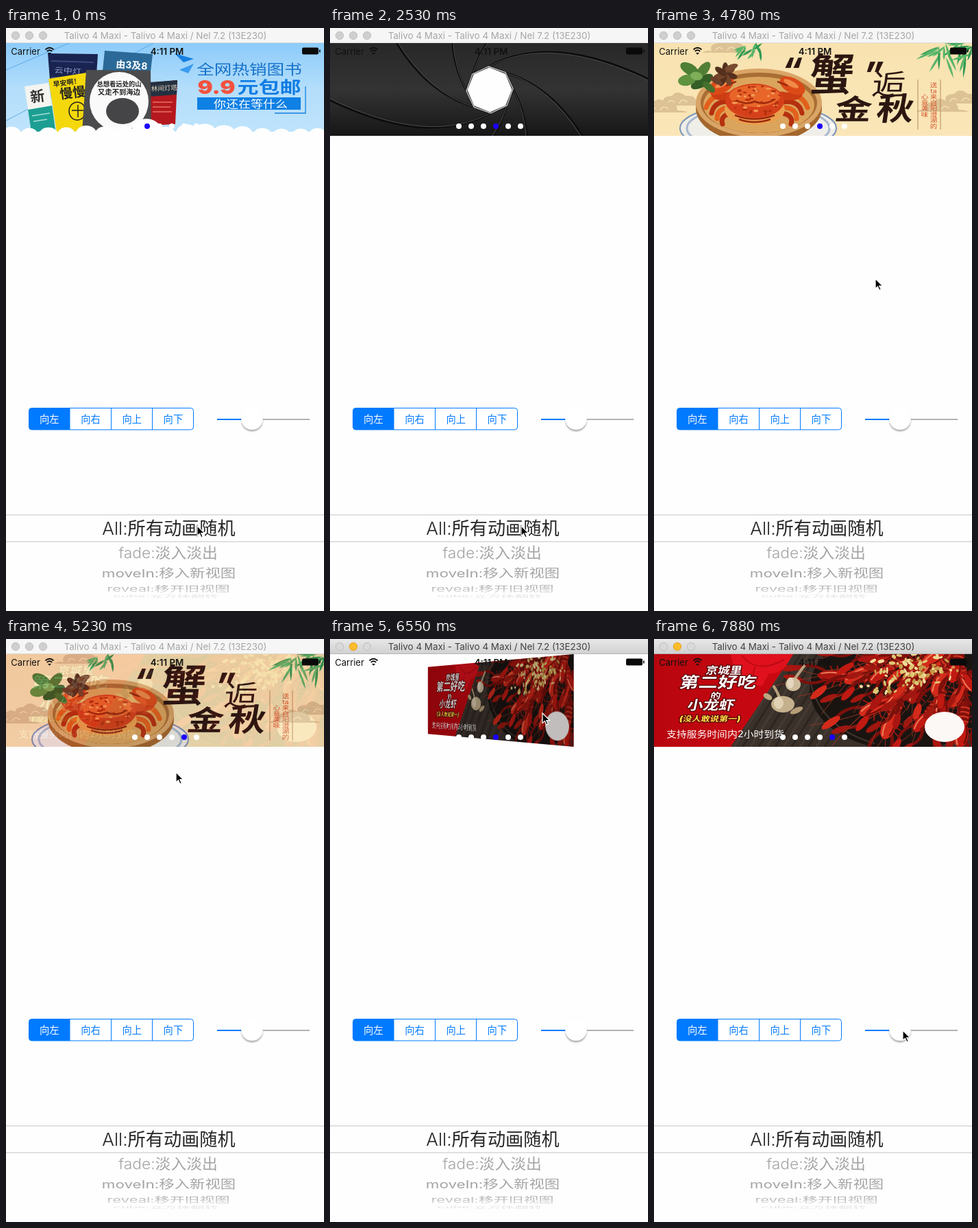
Animation of 464 by 849 pixels, one loop 8000 ms. Source, as an HTML page:

```html
<!DOCTYPE html>
<html lang="zh">
<head>
<meta charset="utf-8">
<title>Banner transitions</title>
<style>
html, body { margin: 0; width: 100%; height: 100%; overflow: hidden; background: #fefefe; }
#stage { position: relative; width: 464px; height: 849px; overflow: hidden; background: #fefefe; }
#stage > svg { position: absolute; left: 0; top: 0; }
.page { position: absolute; left: 0; top: 22px; width: 464px; height: 135px; overflow: hidden; display: none; }
.page svg { display: block; }
#flap { transform-origin: 0 0; }
#flap::after { content: ""; position: absolute; inset: 0; background: #f4f4f4; opacity: .72; }
text { font-family: Inter, "Noto Sans CJK SC", "Noto Sans CJK", sans-serif; text-anchor: middle; }
</style>
</head>
<body>
<div id="stage"></div>
<script>
const W = 464, H = 849;

// ---------- drawing helpers ----------
const range = n => [...Array(n).keys()];
function seeded(a) {
  return () => {
    a = a + 0x6D2B79F5 | 0;
    let t = Math.imul(a ^ a >>> 15, 1 | a);
    t = t + Math.imul(t ^ t >>> 7, 61 | t) ^ t;
    return ((t ^ t >>> 14) >>> 0) / 4294967296;
  };
}
// x is the centre, y the baseline, sy flattens the glyphs
function text(s, x, y, size, fill, o = {}) {
  const edge = o.edge ? ` stroke="${o.edge}" stroke-width="${o.ew || 4}" stroke-linejoin="round" paint-order="stroke"` : '';
  return `<text transform="translate(${x} ${y}) rotate(${o.rot || 0}) skewX(${o.skew || 0}) scale(1 ${o.sy || 1})" ` +
    `font-size="${size}" font-weight="${o.w || 400}" fill="${fill}"${edge}>${s}</text>`;
}
const poly = (pts, fill) => `<polygon points="${pts}" fill="${fill}"/>`;
const oval = (x, y, rx, ry, fill, more = '') => `<ellipse cx="${x}" cy="${y}" rx="${rx}" ry="${ry}" fill="${fill}" ${more}/>`;
const leaf = (x, y, rx, ry, a, fill) => oval(x, y, rx, ry, fill, `transform="rotate(${a} ${x} ${y})"`);
const rect = (x, y, w, h, fill, more = '') => `<rect x="${x}" y="${y}" width="${w}" height="${h}" fill="${fill}" ${more}/>`;
const line = (d, color, w = 1, more = '') => `<path d="${d}" fill="none" stroke="${color}" stroke-width="${w}" ${more}/>`;
const puffs = list => list.map(([x, y, r]) => oval(x, y, r, r * .8, '#fefefe')).join('');

// ---------- banners ----------
function books() {
  return rect(0, 22, W, 135, 'url(#sky)') +
    line('M0 135L215 22M0 61L92 22', '#4a9fe0', .8) +
    poly('61,37 134,38 130,100 66,100', '#1a2450') + text('云中灯', 90, 66, 13, '#93a2cc', { sy: .8, rot: 4 }) +
    line('M66 48L128 50M66 72L120 74', '#3a4a80', 2) +
    poly('144,33 214,38 209,80 140,72', '#2b6a98') + text('由3及8', 183, 59, 14, '#fff', { w: 700, rot: 4 }) +
    line('M164 65L203 68', '#b8d4e6', 1.5) +
    poly('27,85 62,80 72,148 37,152', '#f4f4f0') + poly('32,119 67,113 72,148 37,152', '#1c9f92') +
    text('新', 47, 107, 21, '#333', { w: 700, rot: -8 }) + line('M38 128L64 124M40 136L60 133', '#a8e0d8', 1.5) +
    poly('62,74 118,65 114,150 74,152', '#f4d80c') + text('早安啊！', 89, 83, 10, '#222', { w: 700, rot: -8 }) +
    text('慢慢', 98, 101, 19, '#222', { w: 900, rot: -7 }) +
    line('M96 120h17M105 112v18', '#222', 1.5) + oval(104, 121, 12, 13, 'none', 'stroke="#222" stroke-width="1.5"') +
    poly('207,80 250,76 247,140 210,142', '#b5191f') + poly('210,79 250,76 249,97 209,100', '#243040') +
    text('林间灯塔', 231, 91, 9.5, '#e6d6bc', { rot: -3 }) + line('M214 108h29M214 115h26M214 122h28', '#dc5c50', 2) +
    poly('117,61 211,62 212,152 111,152', '#4b4b4d') + oval(165, 107, 43, 43, '#fafafa') +
    text('总想看远处的山', 165, 85, 9.3, '#222', { w: 700 }) + text('又走不到海边', 165, 97, 10.3, '#222', { w: 700 }) +
    oval(170, 121, 24, 19, '#454547') +
    poly('246,37 274,45 259,50', '#1680e0') + poly('253,61 274,52 266,66', '#3b9cf0') +
    text('全网热销图书', 355, 68, 25.6, '#1571c9', { sy: .8, w: 300 }) +
    text('9.9', 307, 96, 33, '#f4513d', { sy: .84, w: 900 }) +
    text('元包邮', 384, 95, 31, '#0f7be2', { sy: .76, w: 900 }) +
    rect(279, 101, 151, 18, '#0f80e4') + text('你还在等什么', 357, 115.5, 18, '#fff', { sy: .8 }) +
    line('M437 85V124H392', '#1680e0', 1.3) +
    puffs([[8, 155, 14], [34, 155, 12], [62, 156, 14], [88, 155, 13], [117, 154, 15], [145, 156, 16], [172, 156, 17], [205, 149, 21],
      [233, 155, 14], [264, 153, 16], [290, 153, 17], [318, 156, 18], [345, 155, 15], [374, 157, 14], [402, 156, 12], [430, 157, 13], [455, 157, 14]]) +
    rect(0, 151, W, 6, '#fefefe');
}

function packet(x, y, a, s) {
  return `<g transform="translate(${x} ${y}) rotate(${a}) scale(${s})">${rect(-14, -9, 28, 18, '#e0222b')}` +
    line('M-14 -9L0 0L14 -9', '#b9121e', 1.5) + text('¥', 0, 6, 14, '#ffd34a', { w: 700 }) + '</g>';
}
const coin = (x, y, r) => oval(x, y, r, r * .88, '#f2b51d') + oval(x, y, r * .75, r * .64, '#ffd84a') +
  text('¥', x, y + r * .4, r * 1.1, '#d8900c', { w: 700 });

function envelopes() {
  const edge = '#6e0d12', big = (s, x, y, z, sy, c = '#fff') => text(s, x, y, z, c, { w: 900, edge, ew: 5, sy });
  return rect(0, 22, W, 135, '#ffe100') + oval(109, 108, 87, 70, '#fb2f3a') +
    '<path d="M52 43Q55 32 108 36Q160 32 164 46Q166 60 140 61Q108 68 72 60Q50 57 52 43Z" fill="#ee3038"/>' +
    oval(108, 46, 48, 9, '#b70f20') + line('M54 52Q108 70 163 52', '#c41522', 3) +
    coin(76, 43, 11) + coin(147, 43, 11) + coin(151, 71, 11) + coin(79, 60, 5) +
    puffs([[18, 142, 49], [55, 151, 20], [82, 156, 21], [115, 157, 18], [150, 157, 18], [180, 155, 16], [204, 152, 17], [240, 146, 28],
      [296, 150, 39], [330, 155, 22], [362, 154, 22], [398, 152, 22], [455, 133, 45], [428, 150, 25]]) + rect(0, 146, W, 11, '#fefefe') +
    big('千元红包', 106.5, 94, 27, .86) + big('再次来袭', 107, 111, 20, .86) + big('根本停不下来', 107, 133, 18, .86) +
    packet(203, 57, -22, .9) + packet(232, 50, 28, 1.15) + packet(432, 49, -18, .65) + packet(340, 136, 22, .5) +
    big('疯狂的', 265, 94, 31, .86, '#ffe88a') + big('红包', 353, 94, 41, .86, '#ffd83a') + big('君', 409, 94, 29, .86, '#ffe88a') +
    text('升级最新版本领取红包', 320, 115, 18.6, '#f0321f', { w: 700, sy: .8 });
}

function leaves(x, y, n, seed, len) {
  const r = seeded(seed);
  return range(n).map(() => {
    const a = 60 + r() * 120, l = len * (.6 + r() * .5), c = r() < .5 ? '#2f9a52' : '#59b56a';
    return `<path transform="translate(${x + (r() - .5) * len * 1.7} ${y + r() * len * .7}) rotate(${a})" d="M0 0Q${l / 2} -4 ${l} 0Q${l / 2} 3 0 0" fill="${c}"/>`;
  }).join('');
}
const swirl = (x, y) => `<path d="M${x - 14} ${y}q8 -5 14 -2q-4 -12 12 -12q8 -10 20 0q16 -2 16 11q10 0 16 3Z" fill="#dcc294"/>` +
  line(`M${x + 6} ${y - 3}q4 -8 10 -2M${x + 23} ${y - 3}q4 -9 12 -2`, '#f3dfb2', 1.5);

function crab() {
  const cx = 150, both = f => [-1, 1].map(f).join('');
  const legs = both(s => range(4).map(i =>
    line(`M${cx + s * 32} ${102 + i * 7}Q${cx + s * (64 - i * 3)} ${90 + i * 12} ${cx + s * (74 - i * 8)} ${116 + i * 8}`,
      i % 2 ? '#b5300f' : '#e2601c', 7, 'stroke-linecap="round"')).join(''));
  const claws = both(s =>
    line(`M${cx + s * 36} 98Q${cx + s * 64} 104 ${cx + s * 62} 90`, '#cc3d14', 11, 'stroke-linecap="round"') +
    leaf(cx + s * 52, 84, 20, 11, s * 28, '#dc4a18') + leaf(cx + s * 50, 81, 12, 4, s * 28, '#f08a48') +
    line(`M${cx + s * 30} 78L${cx + s * 45} 84`, '#8e230a', 2));
  const r = seeded(4), spots = range(45).map(() => {
    const q = r() * 6.3, d = Math.sqrt(r());
    return oval(cx - 3 + 38 * d * Math.cos(q), 105 + 22 * d * Math.sin(q), 1 + r() * 3, 1 + r(), r() < .5 ? '#f59a55' : '#b2300e');
  }).join('');
  return rect(0, 22, W, 135, 'url(#sand)') + swirl(14, 113) + swirl(-14, 123) + swirl(396, 122) + swirl(426, 110) + swirl(84, 36) +
    leaves(440, 20, 26, 5, 34) + leaves(143, 18, 12, 9, 20) +
    oval(152, 146, 114, 36, '#efeee8', 'stroke="#7c95ba" stroke-width="2"') + oval(152, 146, 104, 33, 'none', 'stroke="#a9b9cf" stroke-width="3"') +
    oval(153, 117, 92, 51, '#a4672d') + oval(153, 109, 92, 50, '#d9a566') + oval(153, 109, 85, 44, '#a86d33') + oval(153, 112, 81, 41, '#dba45c') +
    legs + claws + oval(cx - 3, 119, 44, 22, '#e9a04e') + oval(cx - 3, 106, 43, 25, '#d5401a') + oval(cx - 3, 99, 37, 16, '#e8662a') + spots +
    line(`M${cx - 30} 105q14 8 27 2q13 6 27 -2M${cx - 32} 127q28 11 58 0M${cx - 26} 133q22 8 46 0`, '#9c290c', 2.5) +
    leaf(52, 60, 15, 8, 30, '#4d7f35') + leaf(70, 78, 18, 8, -30, '#345f26') + leaf(48, 76, 13, 8, -10, '#5f9340') +
    leaf(72, 61, 14, 7, -50, '#527f36') + leaf(62, 70, 9, 6, 10, '#7fae58') + leaf(80, 86, 11, 5, 40, '#44702e') +
    range(7).map(i => `<g transform="rotate(${i * 51} 104 68)">${oval(104, 60, 4.5, 10, i % 2 ? '#74452a' : '#54301d')}</g>`).join('') +
    leaf(91, 77, 10, 4, 30, '#6a402a') + leaf(113, 57, 10, 4, -20, '#7a4c30') +
    text('“', 198, 78, 48, '#2c1611', { w: 800, skew: -10 }) + text('”', 317, 84, 48, '#2c1611', { w: 800, skew: -10 }) +
    text('蟹', 257, 91, 64, '#2c1611', { w: 700, skew: -6 }) + text('逅', 341, 97, 48, '#2c1611', { sy: .85, skew: -6 }) +
    text('金', 289, 133, 54, '#2c1611', { w: 700, sy: .75, skew: -8 }) + text('秋', 350, 134, 54, '#2c1611', { w: 700, sy: .85, skew: -8 }) +
    line('M385 75V148M418 75V148', '#b98a58', 1) +
    ['送', 'ta', ...'来自阳澄湖的'].map((c, i) => text(c, 408, 86 + i * 8.5, 10.5, '#d2532a', { sy: .8 })).join('') +
    [...'心意美味'].map((c, i) => text(c, 395, 103 + i * 8.5, 10.5, '#d2532a', { sy: .8 })).join('');
}

// head at the origin, claws towards -x, tail towards +x
function crayfish(x, y, a, s, tone) {
  return `<g transform="translate(${x} ${y}) scale(1 .8) rotate(${a}) scale(${s})">` +
    line('M4 -6Q-14 -20 -34 -11M4 6Q-14 18 -30 8', '#7a100c', 4.5) +
    line('M0 0Q-30 -4 -66 -20M0 0Q-30 8 -60 20', '#9a3420', .8) +
    line('M8 -16L14 0L2 17M17 -17L18 0L12 17M25 -15L24 0L22 16', '#8c1610', 2) +
    leaf(-42, -9, 14, 5, -8, tone) + leaf(-38, 6, 12, 4.500, 10, '#a01710') +
    oval(42, 0, 24, 8, '#820f0b') + oval(13, 0, 20, 9, tone) + line('M-3 -3Q13 -8 27 -3', '#ee7a58', 2) + line('M0 5Q13 9 28 5', '#6d0c08', 2) +
    range(4).map(i => line(`M${32 + i * 7} -7q4 7 0 14`, '#cc3622', 2.5)).join('') + '</g>';
}

function seafood() {
  const r = seeded(37), tones = ['#c01a12', '#d42a1a', '#a91510'];
  const pile = range(26).map(i => {
    const a = 68 + (i * 47 % 122) + r() * 8, q = a * Math.PI / 180, d = 225 - i * 6.5;
    return crayfish(450 + d * Math.cos(q), 12 + d * .68 * Math.sin(q), a + 180 + (r() - .5) * 44, 1 + r() * .25, tones[i % 3]);
  }).join('');
  const bits = range(95).map(i => {
    const u = (r() + r() - 1), v = (r() + r() - 1);
    return leaf(375 + u * 75, 48 - u * 18 + v * 32, 1.500 + r() * 3.500, 1.200 + r() * 2, r() * 180, ['#e0c674', '#c49a48', '#f0dc98'][i % 3]);
  }).join('');
  const white = (s, x, y, z, sy, c = '#fff') => text(s, x, y, z, c, { w: 900, edge: '#5c0508', ew: 3, sy, skew: -12 });
  return rect(0, 22, W, 135, '#3a312b') +
    range(13).map(i => line(`M${105 + i * 12} 157L${190 + i * 12} 22`, i % 2 ? '#463b33' : '#2d2520', 3)).join('') +
    oval(365, 72, 138, 90, '#1a1411') + line('M228 60Q240 128 322 152', '#40352e', 2) + pile + bits +
    poly('0,22 203,22 112,157 0,157', 'url(#red)') +
    '<path d="M112 22H203L192 40Q180 52 168 50L158 68Q140 70 134 56Q116 50 112 22Z" fill="#e0111c"/>' +
    line('M128 24Q150 52 190 30M150 64Q142 50 148 40', '#bd0a15', 2) +
    line('M204 60Q214 46 220 38M184 88Q180 76 174 68', '#b7a17c', 4) +
    oval(203, 66, 11, 10, '#cdbb9b') + oval(199, 64, 5, 8, '#e4d7bf') +
    oval(188, 95, 17, 12, '#c4b08c') + oval(182, 93, 7, 9, '#e0d1b4') + leaf(208, 104, 10, 4, -25, '#b59e78') + leaf(166, 84, 7, 4, 30, '#bda680') +
    white('京城里', 101, 51, 17.5, .85) + white('第二好吃', 92, 71, 28, .8) + white('的', 89, 87, 15, .8) + white('小龙虾', 82, 103, 23, .82) +
    white('(没人敢说第一)', 81, 120, 13.2, .82, '#ffe24a') +
    text('支持服务时间内2小时到货', 104, 142.5, 14.8, '#fff', { sy: .85 }) +
    oval(424, 128, 29, 22, '#fbf8f6');
}

function iris() {
  const hole = range(8).map(i => {
    const a = (i * 45 - 93) * Math.PI / 180;
    return `${(34 * Math.cos(a)).toFixed(1)} ${(34 * Math.sin(a)).toFixed(1)}`;
  }).join('L');
  const blades = range(8).map(i => `<g transform="rotate(${i * 45})">` +
    line('M24 24L1 34Q-90 84 -233 15', '#0c0c0c', 3) + line('M24 24L1 34Q-90 82 -233 13', '#4c4c4c', 1) + '</g>').join('');
  return `<g id="blades"><path fill-rule="evenodd" fill="url(#steel)" d="M-600 -600H600V600H-600ZM${hole}Z"/>${blades}` +
    `<path d="M${hole}Z" fill="none" stroke="#bdbdbd" stroke-width="1.5" vector-effect="non-scaling-stroke"/></g>`;
}

// ---------- fixed interface ----------
const stops = (id, dir, list) => `<linearGradient id="${id}" ${dir}>` +
  list.map((c, i) => `<stop offset="${i / (list.length - 1)}" stop-color="${c}"/>`).join('') + '</linearGradient>';
const down = 'x1="0" y1="0" x2="0" y2="1"';
const defs = '<defs>' + stops('sky', down, ['#8ccbfa', '#b4defb', '#c0e4fc']) + stops('sand', down, ['#f8e2b0', '#fae6b8']) +
  stops('red', 'x1="0" y1="0" x2="1" y2="0"', ['#b8060e', '#cc0812']) + stops('bar', down, ['#e8e8e8', '#d0d0d0']) +
  stops('fade', down, ['#a4a4a4', '#dedede']) +
  stops('steel', 'gradientUnits="userSpaceOnUse" x1="0" y1="-68" x2="0" y2="68"', ['#282828', '#333333', '#161616']) +
  '<filter id="soft" x="-50%" y="-50%" width="200%" height="200%"><feGaussianBlur stdDeviation="1.3"/></filter></defs>';

function controls() {
  const blue = '#007aff';
  return rect(33.5, 553.5, 240, 31.5, '#fff', `rx="4" stroke="${blue}"`) +
    `<path d="M93.500 553.500H37.500a4 4 0 0 0 -4 4v23.500a4 4 0 0 0 4 4h56Z" fill="${blue}"/>` +
    line('M153.500 553.500v31.500M213.500 553.500v31.500', blue) +
    [...'左右上下'].map((c, i) => text('向' + c, 63.3 + i * 60.2, 574.6, 14.3, i ? blue : '#fff')).join('') +
    line('M308 570H443', '#b3b3b3', 2) + line('M308 570H345', blue, 2) +
    oval(359, 572.5, 15.5, 15, '#000', 'opacity=".32" filter="url(#soft)"') + oval(359, 569.5, 15.8, 15.5, '#fff') +
    line('M0 709H464M0 748H464', '#d6d6d6', 1.5) +
    text('All:所有动画随机', 237.5, 738, 26.2, '#262626', { w: 300 }) +
    text('fade:淡入淡出', 236.5, 772, 22.8, '#a4a4a4', { sy: .95, w: 300 }) +
    text('moveIn:移入新视图', 237.5, 800, 22.4, '#a4a4a4', { sy: .74 }) +
    text('reveal:移开旧视图', 237, 821, 22, 'url(#fade)', { sy: .5 }) +
    text('cube:立方体翻转', 233, 829, 20, '#e4e4e4', { sy: .24 });
}

function status() {
  return text('Carrier', 28.5, 38.5, 13, '#111') + text('4:11 PM', 235, 38.5, 13.3, '#111', { w: 600 }) +
    line('M57.500 31.500Q63.500 26 69.500 31.500M59.800 34Q63.500 30.500 67.200 34', '#111', 1.8) + poly('61,36 66,36 63.5,39', '#111') +
    rect(432, 28.5, 24, 10, '#0a0a0a', 'rx="2"') + rect(457, 31.5, 1.6, 4, '#0a0a0a') +
    range(6).map(i => `<circle class="dot" cx="${188 + i * 18}" cy="143" r="4"/>`).join('');
}

function titleBar(on) {
  return rect(0, 0, W, 22, on ? 'url(#bar)' : '#f6f6f6') + rect(0, 21, W, 1, on ? '#b4b4b4' : '#dcdcdc') +
    range(3).map(i => {
      const lit = on && i === 1;
      return oval(14 + i * 20, 11, 5.7, 5.7, lit ? '#fdbc2e' : on ? '#d9d9d9' : '#cfcfcf', `stroke="${lit ? '#e0a123' : '#c0c0c0'}"`);
    }).join('') +
    text('Talivo 4 Maxi - Talivo 4 Maxi / Nel 7.2 (13E230)', 232.5, 16, 13.4, on ? '#404040' : '#a6a6a6');
}

const layer = (body, attr = '') => `<svg width="${W}" height="${H}" viewBox="0 0 ${W} ${H}" ${attr}>${body}</svg>`;
const page = (id, body, box = '0 22 464 135') => `<div class="page" id="${id}"><svg width="${W}" height="135" viewBox="${box}">${body}</svg></div>`;
const $ = id => document.getElementById(id);

$('stage').innerHTML = layer(defs + controls()) +
  page('envelopes', envelopes()) + page('books', books()) + page('flap', books()) +
  page('crab', crab()) + page('seafood', seafood()) + page('iris', iris(), '-233 -68 464 135') +
  layer(status()) + layer(titleBar(false), 'id="idle"') + layer(titleBar(true), 'id="active"') +
  layer('<path id="cursor" d="M0 0V14.500L3.400 11.400L5.800 16.800L8.200 15.700L5.800 10.500H10.500Z" fill="#000" stroke="#fff" stroke-width="1.2"/>');

// ---------- motion ----------
const LOOP = 8000;
const spans = [[150, 1030, 7], [2530, 3430, 7], [4780, 5820, 8], [5960, 6990, 8], [7130, 7880, 6]];
const track = [[4780, 323, 365], [5500, 212, 112], [6110, 212, 112], [6550, 310, 108], [6990, 338, 232],
  [7130, 340, 250], [7500, 368, 636], [7880, 363, 570]];
const dots = document.querySelectorAll('.dot');
const clamp = v => Math.min(1, Math.max(0, v));
const ease = p => p * p * (3 - 2 * p);
const part = (t, a, b) => clamp((t - a) / (b - a));

function stepped(t) {
  const s = spans.find(([a, b]) => t >= a && t < b);
  if (!s) return t;
  const d = (s[1] - s[0]) / (s[2] - 1);
  return s[0] + d * Math.floor((t - s[0]) / d + .02);
}
function cursorAt(t) {
  if (t < track[0][0]) return [279, 725];
  const i = track.findIndex(k => k[0] > t);
  if (i < 0) return track[track.length - 1].slice(1);
  const [a, b] = [track[i - 1], track[i]], p = ease(part(t, a[0], b[0]));
  return [a[1] + (b[1] - a[1]) * p, a[2] + (b[2] - a[2]) * p];
}
function show(id, css = {}) {
  Object.assign($(id).style, { display: 'block', opacity: 1, transform: 'none', filter: 'none', clipPath: 'none' }, css);
}
// folds the page along a slanted line that runs from right to left
function curl(p) {
  const a = .26, nx = Math.cos(a), ny = -Math.sin(a), x = 500 - 590 * p, y = 67;
  const half = side => 'polygon(' + [[-1, 0], [1, 0], [1, side], [-1, side]].map(([u, v]) =>
    `${x - u * 900 * ny + v * 1200 * nx}px ${y + u * 900 * nx + v * 1200 * ny}px`).join(',') + ')';
  const k = 2 * (x * nx + y * ny);
  show('books', { clipPath: half(-1) });
  show('flap', {
    clipPath: half(1),
    transform: `matrix(${1 - 2 * nx * nx},${-2 * nx * ny},${-2 * nx * ny},${1 - 2 * ny * ny},${k * nx},${k * ny})`
  });
}
function flip(p) {
  const deg = 180 * ease(p), sin = Math.sin(deg * Math.PI / 180), front = deg < 90;
  show(front ? 'seafood' : 'crab', {
    transform: `perspective(1013px) translateZ(${-232 * sin}px) rotateY(${front ? -deg : 180 - deg}deg)`,
    filter: `brightness(${1 - .28 * sin})`
  });
}
function draw(now) {
  const t = stepped(now % LOOP);
  document.querySelectorAll('.page').forEach(e => e.style.display = 'none');
  let index = 4;
  if (t < 150) { show('books'); index = 1; }
  else if (t < 2530) {
    show('envelopes'); index = 2;
    if (t < 1030) curl(ease(part(t, 0, 1030)));
  } else if (t < 5070) {
    const p = part(t, 2530, 3430);
    show('crab', { opacity: p }); index = 3;
    if (p < 1) {
      show('iris');
      $('blades').setAttribute('transform', `rotate(${60 * p}) scale(${1 + 7 * ease(p)})`);
    }
  } else if (t < 6280) {
    if (t < 5820) show('crab');
    show('seafood', { opacity: ease(part(t, 5070, 5820)) });
  } else if (t < 7130) { flip(part(t, 6280, 6990)); index = 3; }
  else {
    show('crab');
    show('seafood', { transform: `translateX(${W * (1 - ease(part(t, 7000, 7880)))}px)` });
  }
  dots.forEach((d, i) => d.setAttribute('fill', i === index ? '#1a00ff' : '#fff'));
  const on = t >= 6100;
  $('idle').style.display = on ? 'none' : 'block';
  $('active').style.display = on ? 'block' : 'none';
  $('cursor').setAttribute('transform', `translate(${cursorAt(t)})`);
}
const start = performance.now();
function tick() {
  draw(performance.now() - start);
  requestAnimationFrame(tick);
}
tick();
</script>
</body>
</html>
```
